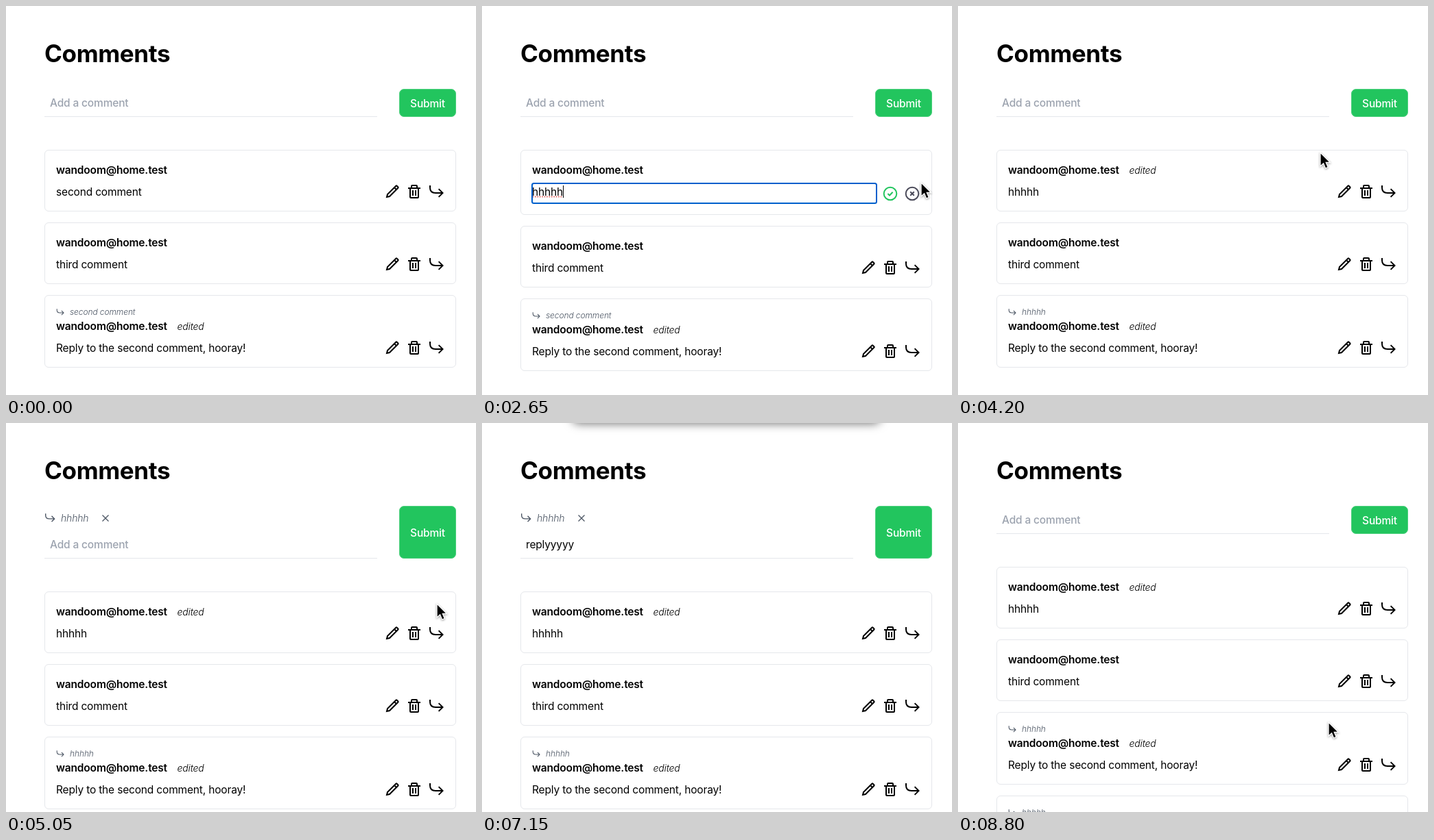
An HTML page that plays this animation: 685 by 568 pixels, repeating every 8.89 s.

```html
<!DOCTYPE html>
<html lang="en">
<head>
<meta charset="utf-8">
<title>Comments</title>
<style>
  html, body { margin: 0; width: 100%; height: 100%; overflow: hidden; background: #fff; }
  svg { display: block; width: 685px; height: 568px; }
  text { font: 15.5px Inter, "Liberation Sans", sans-serif; letter-spacing: -.17px; white-space: pre; }
  .title { font-size: 35px; font-weight: 700; letter-spacing: -.35px; }
  .name { font-weight: 600; }
  .button { font-weight: 500; fill: #fff; text-anchor: middle; }
  .hint { fill: #9ca3af; font-weight: 500; }
  .note { font-size: 14px; font-weight: 300; font-style: italic; }
  .quote { fill: #4b5563; }
  .small { font-size: 12px; letter-spacing: -.1px; }
  .icon { fill: none; stroke: #000; stroke-width: 2; }
  .dialog { fill: #fff; filter: drop-shadow(0 1px 7px rgba(0, 0, 0, .55)); }
  .arrow { stroke: #fff; stroke-width: 1.3; filter: drop-shadow(0 1.5px 1.5px rgba(0, 0, 0, .4)); }
</style>
</head>
<body>
<svg id="stage" viewBox="0 0 685 568"></svg>
<script>
const LOOP = 8890, STEP = 50;
const AUTHOR = 'wandoom@home.test', OLD = 'second comment', NEW = 'hhhhh', REPLY = 'replyyyyy';

// Moments of the story, in ms
const EDIT = 450, ERASE = 1050, SPELL = 2500, SAVE = 2900, SAVED = 4050;
const QUOTE = 4950, FOCUS = 5800, SUBMIT = 6850, POSTED = 8350;
const NEW_KEYS = [1650, 1950, 2050, 2150, 2250];
const REPLY_KEYS = [5800, 5950, 6050, 6100, 6200, 6250, 6300, 6450, 6500];
const DIALOGS = [[3000, 3400], [6950, 7350]];
const HIDDEN = [[0, 50], [1050, 2500], [5950, 6550]];

// Pointer path: time, x, y
const PATH = [
  [0, 700, 350], [350, 563, 271], [450, 563, 271], [650, 332, 276], [2500, 332, 276],
  [2650, 640, 258], [2800, 595, 272], [2950, 595, 272], [3300, 541, -40], [3500, 541, -40],
  [3550, 538, 38], [3750, 530, 150], [4050, 530, 150], [4200, 528, 214], [4700, 627, 268],
  [4950, 628, 264], [5200, 628, 264], [5750, 262, 186], [6550, 262, 186], [6680, 480, 212],
  [6800, 618, 165], [6900, 618, 165], [7100, 545, -40], [7500, 545, -40], [7550, 545, 6],
  [7800, 540, 220], [8200, 600, 540], [8350, 600, 540], [8750, 540, 437], [LOOP, 540, 437]
];

const ICONS = {
  pencil: 'M-8 8l1-4L5.3-8.3q.7-.7 1.4 0l1.6 1.6q.7.7 0 1.4L-4 7zM3.7-5.3l1.6 1.6',
  trash: 'M-9-5H9M-6-5V8q0 1 1 1H5q1 0 1-1V-5M-4-5v-3q0-1 1-1H3q1 0 1 1v3M-2-2V6M2-2V6',
  reply: 'M-9-9v3.5c0 5 3 7.5 8 7.5H9.5M3.6-3.9l5.9 5.9-5.9 5.9',
  check: 'M-3.6.1l2.6 2.4 4.6-4.7',
  cross: 'M-2.8-2.8l5.6 5.6M2.8-2.8l-5.6 5.6'
};

const ruler = document.createElement('canvas').getContext('2d');
ruler.font = '15.5px Inter, "Liberation Sans", sans-serif';
ruler.letterSpacing = '-.17px';
const widthOf = s => ruler.measureText(s).width;

const within = (t, spans) => spans.some(([a, b]) => t >= a && t < b);
const typed = (word, keys, t) => word.slice(0, keys.filter(k => k <= t).length);
const text = (x, y, s, cls = '') => `<text x="${x}" y="${y}" class="${cls}">${s}</text>`;
const icon = (name, x, y, style = '', scale = 1) =>
  `<path class="icon" d="${ICONS[name]}" transform="translate(${x} ${y}) scale(${scale})" style="${style}"/>`;
const ringIcon = (name, x, y, color) =>
  `<circle class="icon" cx="${x}" cy="${y}" r="9.3" style="stroke:${color}"/>` + icon(name, x, y, `stroke:${color}`);
const caret = (x, y) => `<path d="M${x.toFixed(1)} ${y - 9}v18" stroke="#000"/>`;

function pointerAt(t) {
  const i = PATH.findIndex(p => p[0] > t);
  const [t0, x0, y0] = PATH[i - 1], [t1, x1, y1] = PATH[i];
  const k = (t - t0) / (t1 - t0), e = k * k * (3 - 2 * k);
  return [x0 + (x1 - x0) * e, y0 + (y1 - y0) * e];
}

function draftAt(t) {
  if (t < ERASE) return OLD;
  if (t >= NEW_KEYS[0]) return typed(NEW, NEW_KEYS, t);
  if (t < 1250) return OLD.slice(0, 13);
  return OLD.slice(0, Math.max(0, Math.ceil(13 * (1 - (t - 1200) / 300))));
}

function editor(y, t) {
  const draft = draftAt(t), end = 73 + widthOf(draft), focused = t < SAVE;
  const ready = draft && draft !== OLD;
  return text(73, y + 67, draft)
    + (t >= SPELL ? `<path class="icon" d="M74.5 ${y + 68.5}H${end}" stroke-linecap="round" stroke-dasharray="0 3.4" style="stroke:#e5605b"/>` : '')
    + (focused ? caret(end + .5, y + 61)
      + `<rect x="73" y="${y + 49}" width="502" height="29" rx="2.5" fill="none" stroke="#005fcc" stroke-width="2"/>` : '')
    + ringIcon('check', 595, y + 64, ready ? '#22c55e' : '#d4d4d8')
    + ringIcon('cross', 627, y + 64, '#4b4b5a');
}

function card(y, { body, quote, edited, editing }, t) {
  const height = editing ? 95 : quote ? 106 : 90, top = quote ? y + 16 : y;
  const out = `<rect x="56.5" y="${y + .5}" width="599" height="${height - 1}" rx="5.5" fill="#fff" stroke="#e5e7eb"/>`
    + (quote ? icon('reply', 79, y + 25, 'stroke:#4b5563', .53) + text(93, y + 29, quote, 'note small quote') : '')
    + text(73, top + 35, AUTHOR, 'name')
    + (edited ? text(249.5, top + 35, 'edited', 'note') : '')
    + (editing ? editor(y, t) : text(73, top + 67, body)
      + ['pencil', 'trash', 'reply'].map((n, i) => icon(n, 563 + 32 * i, top + 61)).join(''));
  return [out, y + height + 16];
}

function form(t, quoting, first) {
  const shift = quoting ? 36 : 0, focused = t >= FOCUS && t < SUBMIT;
  const value = quoting ? typed(REPLY, REPLY_KEYS, t) : '';
  return (quoting ? icon('reply', 64, 138.5, 'stroke:#4b5563', .7) + text(80, 144, first, 'note quote')
      + icon('cross', 145, 139, 'stroke:#4b5563;stroke-width:.8', 1.6) : '')
    + text(64, 147 + shift, value || 'Add a comment', value ? '' : 'hint')
    + (focused ? caret(64.5 + widthOf(value), 141 + shift) : '')
    + `<path d="M56 ${161.5 + shift}H541" stroke="#e5e7eb"/>`
    + `<rect x="573.5" y="121.5" width="82" height="${40 + shift}" rx="6.5" fill="#22c55e" stroke="#4fd07f"/>`
    + text(614.5, 147.6 + shift / 2, 'Submit', 'button');
}

function pointer(t, editing, quoting) {
  if (within(t, HIDDEN)) return '';
  const [x, y] = pointerAt(t);
  const overEditor = editing && x > 72 && x < 576 && y > 258 && y < 289;
  const overInput = quoting && x > 56 && x < 541 && y > 157 && y < 198;
  const at = `transform="translate(${x.toFixed(1)} ${y.toFixed(1)})"`;
  if (!overEditor && !overInput)
    return `<path class="arrow" d="M0 0V20l4.6-4.2 3 7.2 3.7-1.6-3-6.9h6.2z" ${at}/>`;
  const beam = 'M-5-12q5 0 5 4V8q0 4-5 4M5-12q-5 0-5 4M0 8q0 4 5 4M-3 3H3';
  return `<g fill="none" ${at}><path d="${beam}" stroke="#fff" stroke-width="3.5"/>`
    + `<path d="${beam}" stroke="#222" stroke-width="1.6"/></g>`;
}

function scene(t) {
  const editing = t >= EDIT && t < SAVED, quoting = t >= QUOTE && t < POSTED;
  const edited = t >= SAVED, first = edited ? NEW : OLD;
  const comments = [
    { body: first, edited, editing },
    { body: 'third comment' },
    { body: 'Reply to the second comment, hooray!', quote: first, edited: true }
  ];
  if (t >= POSTED) comments.push({ body: REPLY, quote: first });

  let out = text(56, 82, 'Comments', 'title') + form(t, quoting, first);
  let y = quoting ? 246 : 210;
  for (const comment of comments) {
    const [markup, next] = card(y, comment, t);
    out += markup;
    y = next;
  }
  if (within(t, DIALOGS)) out += '<rect class="dialog" x="131" y="-80" width="450" height="80" rx="10"/>';
  return out + pointer(t, editing, quoting);
}

const stage = document.getElementById('stage');
let shown = -1;
function tick() {
  const t = Math.floor(performance.now() % LOOP / STEP) * STEP;
  if (t !== shown) stage.innerHTML = scene(shown = t);
  requestAnimationFrame(tick);
}
tick();
</script>
</body>
</html>
```
